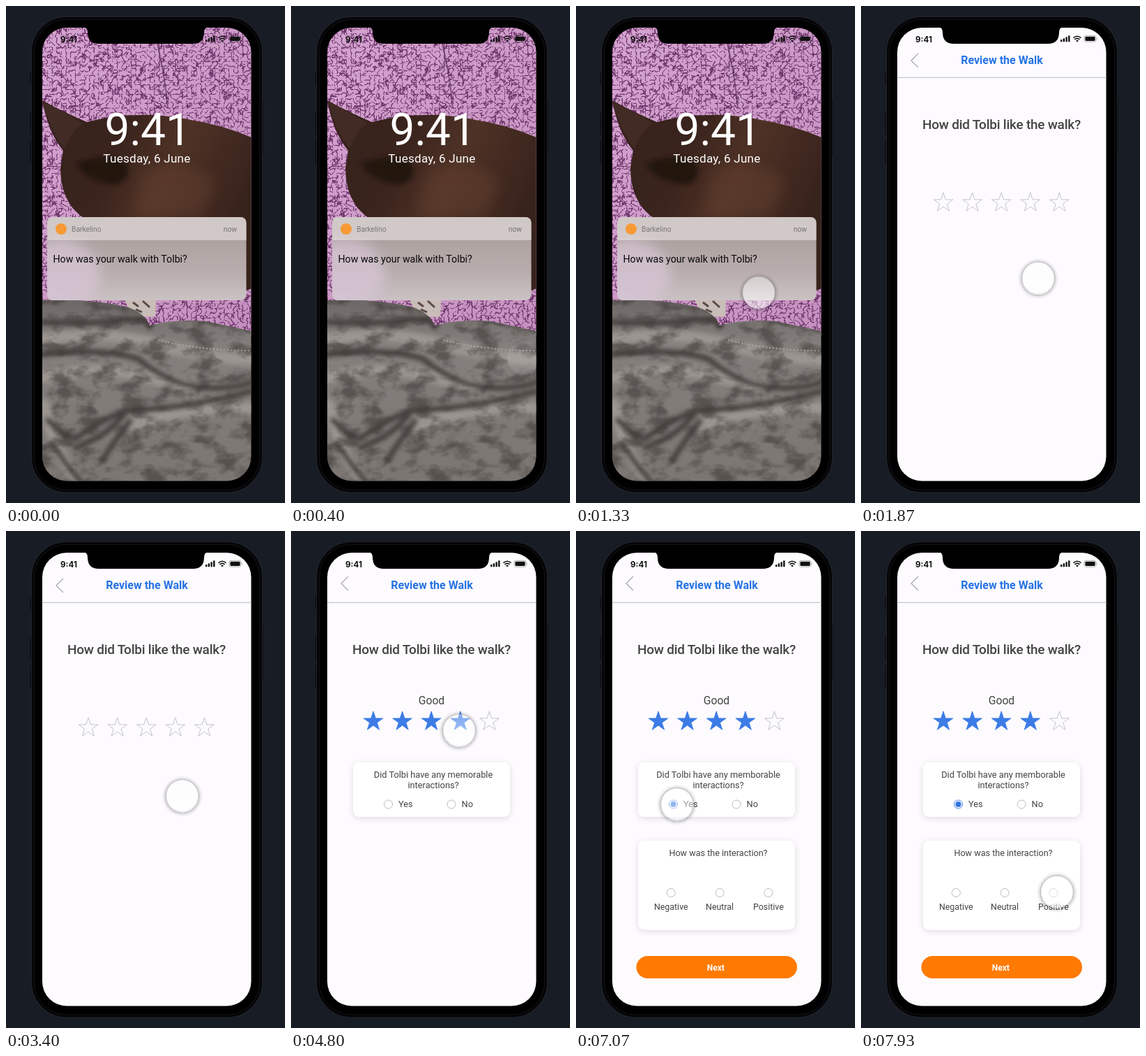
An HTML page that plays this animation: 400x711 px, repeating every 8 s.

```html
<!DOCTYPE html>
<html lang="en">
<head>
<meta charset="utf-8">
<title>Walk review</title>
<style>
  html, body { margin: 0; width: 100%; height: 100%; overflow: hidden; background: #181c24; }
  svg { display: block; width: 100%; height: 100%; }
  text { font-family: Roboto, "Open Sans", sans-serif; fill: #444; }
  .mid { text-anchor: middle; }
  .body { font-size: 12.8px; }
  .radio { fill: #fff; stroke: #b4b4b8; stroke-width: .9; }
  .card { fill: #fff; filter: url(#soft); }
</style>
</head>
<body>
<svg id="stage" viewBox="0 0 400 711" preserveAspectRatio="xMidYMid slice">
  <defs>
    <clipPath id="screen"><rect x="52" y="31" width="299.500" height="648.500" rx="35"/></clipPath>
    <clipPath id="note"><rect x="59" y="302" width="285.500" height="119" rx="8"/></clipPath>
    <clipPath id="cover"><path id="coverShape" d="M52 421Q120 418 172 430Q198 438 206 457Q240 447 286 451Q325 459 352 465V680H52Z"/></clipPath>
    <filter id="soft" x="-10%" y="-20%" width="120%" height="150%">
      <feDropShadow dx="0" dy="2" stdDeviation="4" flood-color="#000" flood-opacity=".13"/>
    </filter>
    <filter id="blur" x="-30%" y="-50%" width="160%" height="200%"><feGaussianBlur stdDeviation="9"/></filter>
    <filter id="blurSmall" x="-20%" y="-20%" width="140%" height="140%"><feGaussianBlur stdDeviation="3"/></filter>
    <filter id="fleece" x="0" y="0" width="100%" height="100%" color-interpolation-filters="sRGB">
      <feTurbulence type="turbulence" baseFrequency=".15" numOctaves="2" seed="4"/>
      <feColorMatrix values="0 0 0 0 .42  0 0 0 0 .2  0 0 0 0 .41  -7 0 0 0 1.5"/>
    </filter>
    <filter id="plush" x="0" y="0" width="100%" height="100%" color-interpolation-filters="sRGB">
      <feTurbulence type="fractalNoise" baseFrequency=".03 .05" numOctaves="4" seed="9"/>
      <feColorMatrix values="0 0 0 0 .25  0 0 0 0 .23  0 0 0 0 .22  3.500 0 0 0 -1.550"/>
    </filter>
    <linearGradient id="pink" x1="0" y1="0" x2="1" y2="1">
      <stop offset="0" stop-color="#d5a3d0"/><stop offset="1" stop-color="#c591c0"/>
    </linearGradient>
    <linearGradient id="fur" x1="0" y1="0" x2="1" y2=".4">
      <stop offset="0" stop-color="#35211c"/><stop offset=".4" stop-color="#3a241d"/>
      <stop offset=".65" stop-color="#4f3226"/><stop offset="1" stop-color="#38231c"/>
    </linearGradient>
    <linearGradient id="blanket" x1="0" y1="0" x2="0" y2="1">
      <stop offset="0" stop-color="#6d6866"/><stop offset=".25" stop-color="#85807d"/>
      <stop offset="1" stop-color="#7c7673"/>
    </linearGradient>
    <linearGradient id="glass" x1="0" y1="0" x2="0" y2="1">
      <stop offset=".25" stop-color="#aea2a1"/><stop offset=".65" stop-color="#b8adac"/>
      <stop offset="1" stop-color="#cbc2c4"/>
    </linearGradient>
    <linearGradient id="lens" x1="0" y1="0" x2="0" y2="1">
      <stop offset="0" stop-color="#fff" stop-opacity=".35"/>
      <stop offset="1" stop-color="#fff" stop-opacity=".6"/>
    </linearGradient>
    <radialGradient id="halo">
      <stop offset=".78" stop-color="#000" stop-opacity="0"/>
      <stop offset=".79" stop-color="#000" stop-opacity=".24"/>
      <stop offset=".88" stop-color="#000" stop-opacity=".08"/>
      <stop offset="1" stop-color="#000" stop-opacity="0"/>
    </radialGradient>
  </defs>

  <!-- phone -->
  <rect width="400" height="711" fill="#181c24"/>
  <g fill="#0b0c11" stroke="#22252d" stroke-width=".8">
    <rect x="34" y="94" width="4" height="19" rx="1"/>
    <rect x="34" y="151" width="4" height="34" rx="1"/>
    <rect x="34" y="191" width="4" height="34" rx="1"/>
    <rect x="365.500" y="133" width="4" height="81" rx="1"/>
    <rect x="36.500" y="15.500" width="331" height="680.500" rx="50" fill="#050507" stroke="#22242b" stroke-width="1.200"/>
    <rect x="40.500" y="19.500" width="323" height="672.500" rx="46" fill="#000" stroke="#17181d"/>
  </g>

  <g clip-path="url(#screen)">
    <g id="lock">
      <rect x="52" y="31" width="300" height="440" fill="url(#pink)"/>
      <rect x="52" y="31" width="300" height="440" filter="url(#fleece)"/>
      <path d="M217 54Q228 100 232 146" fill="none" stroke="#4d2450" stroke-opacity=".6" stroke-width="2"/>
      <path d="M52 135Q85 153 116 166Q190 147 265 163Q310 170 352 188V404Q330 416 230 412L112 304Q78 280 78 232L82 207Q60 180 52 135Z" fill="url(#fur)"/>
      <path d="M195 235Q265 215 300 250L280 300H180Z" fill="#664231" opacity=".45" filter="url(#blur)"/>
      <path d="M53 137Q82 150 110 168Q96 176 84 204Q64 180 53 137Z" fill="#422b25"/>
      <path d="M101 225Q145 208 172 224Q182 246 158 256Q112 250 101 225Z" fill="#231411" filter="url(#blurSmall)"/>
      <path d="M170 420L215 420L214 444Q192 448 176 432Z" fill="#c9bdb7"/>
      <path d="M182 424l8 6m6-8l10 9m-20 3l9 4" stroke="#594a44" stroke-width="3"/>
      <use href="#coverShape" fill="url(#blanket)"/>
      <g clip-path="url(#cover)">
        <g fill="none" filter="url(#blurSmall)" stroke-linecap="round" stroke-width="16">
          <g stroke="#9b9591">
            <path d="M52 476Q150 464 218 484T352 506"/>
            <path d="M52 532Q130 513 190 528T270 545"/>
            <path d="M180 600Q260 572 350 575"/>
            <path d="M54 570Q70 640 100 674"/>
          </g>
          <g stroke="#45403e" stroke-width="8">
            <path d="M52 452Q110 456 160 450T206 459"/>
            <path d="M48 499Q140 488 190 505Q230 540 275 545T355 537"/>
            <path d="M60 592Q80 616 100 618Q140 590 176 577Q250 580 355 550"/>
            <path d="M66 625Q85 655 108 682M100 632Q150 612 170 582M138 650Q160 615 178 595"/>
          </g>
        </g>
        <rect x="52" y="418" width="300" height="262" filter="url(#plush)" opacity=".6"/>
        <path d="M218 478Q280 493 350 493" fill="none" stroke="#b6afab" stroke-width="1.500" stroke-dasharray="2 3"/>
      </g>

      <g clip-path="url(#note)">
        <rect x="59" y="302" width="286" height="119" fill="url(#glass)"/>
        <ellipse cx="75" cy="385" rx="60" ry="50" fill="#d6c4d4" opacity=".8" filter="url(#blur)"/>
        <rect x="59" y="302" width="286" height="33" fill="#efeae9" opacity=".55"/>
      </g>
      <circle cx="79" cy="319" r="8" fill="#f79a36"/>
      <text x="94" y="323" font-size="10.300" style="fill:#7d777a">Barkelino</text>
      <text x="331" y="322.500" font-size="10.300" text-anchor="end" style="fill:#777174">now</text>
      <text x="67.500" y="366.500" font-size="14.200" style="fill:#090909">How was your walk with Tolbi?</text>
      <text class="mid" x="203.200" y="199" font-size="64" style="fill:#fff">9:41</text>
      <text class="mid" x="202" y="224" font-size="17.100" letter-spacing=".25" style="fill:#fff">Tuesday, 6 June</text>
    </g>

    <g id="review">
      <rect x="52" y="31" width="300" height="649" fill="#fdfbfe"/>
      <path id="back" d="M82 -10L72 0L82 10" fill="none" stroke="#a9a9ad" stroke-width="1.300"/>
      <text class="mid" x="202" y="83" font-size="16" font-weight="700" style="fill:#2673e4">Review the Walk</text>
      <path d="M52 102.300H352" stroke="#c5c4c7" stroke-width="1.200"/>
      <text class="mid" x="201.500" y="176.300" font-size="19" font-weight="500" letter-spacing="-.25">How did Tolbi like the walk?</text>
      <g id="stars"></g>
      <g id="rated">
        <text class="mid" x="201.500" y="247.500" font-size="15.700">Good</text>
        <rect class="card" x="89" y="331" width="225" height="78" rx="9"/>
        <text id="ask" class="mid body" x="204" y="353"></text>
        <text class="mid body" x="204" y="368">interactions?</text>
        <circle id="yes" class="radio" cx="139.500" cy="391" r="6"/>
        <circle id="dot" cx="139.500" cy="391" r="4" fill="#2f74e2"/>
        <text class="body" x="154" y="395.300">Yes</text>
        <circle class="radio" cx="230" cy="391" r="6"/>
        <text class="body" x="244.500" y="395.300">No</text>
      </g>
      <g id="detail">
        <rect class="card" x="89" y="443" width="225" height="127.500" rx="9"/>
        <text class="mid" x="204" y="465" font-size="12.600">How was the interaction?</text>
        <g id="moods"></g>
        <rect x="86.500" y="608" width="230.500" height="32" rx="16" fill="#ff7a00"/>
        <text class="mid" x="200.300" y="628.500" font-size="12" font-weight="700" style="fill:#fff">Next</text>
      </g>
    </g>

    <!-- status bar -->
    <text class="mid" x="90" y="51.500" font-size="11.600" font-weight="700" style="fill:#111;font-family:Inter,sans-serif">9:41</text>
    <g fill="#111">
      <rect x="286" y="48" width="2.400" height="3.300" rx=".6"/>
      <rect x="289.700" y="46.300" width="2.400" height="5" rx=".6"/>
      <rect x="293.400" y="44.300" width="2.400" height="7" rx=".6"/>
      <rect x="297.100" y="42.300" width="2.400" height="9" rx=".6"/>
      <path d="M308 49.500L310 51.500L312 49.500Q310 48.200 308 49.500Z"/>
      <path d="M304.500 45.600Q310 40.900 315.500 45.600M306.400 47.900Q310 44.900 313.600 47.900" fill="none" stroke="#111" stroke-width="1.600"/>
      <rect x="320" y="42.300" width="17" height="9" rx="2.500" fill="none" stroke="#111" stroke-opacity=".4" stroke-width=".8"/>
      <rect x="321.400" y="43.700" width="14.200" height="6.200" rx="1.400"/>
      <path d="M338.200 45.400q1.500 1.400 0 2.800z" fill-opacity=".5"/>
    </g>

    <g id="touch">
      <g id="idle">
        <circle cy="1" r="29.500" fill="url(#halo)"/>
        <circle r="23" fill="url(#lens)" stroke="#c2c2c6" stroke-opacity=".7" stroke-width=".8"/>
      </g>
      <circle id="pressed" r="23" fill="#e6e6e8" fill-opacity=".6" stroke="#b2b2b6" stroke-opacity=".75" stroke-width="1"/>
    </g>
  </g>
  <path d="M110 30Q117 30 117 37.500Q117 54 133 54H268Q284 54 284 37.500Q284 30 291 30Z" fill="#000"/>
</svg>

<script>
const LOOP = 8000;
const OPEN = 1800, RATED = 4400, ANSWERED = 6470;
const $ = id => document.getElementById(id);
const clamp = v => Math.max(0, Math.min(1, v));
const span = (t, a, b) => clamp((t - a) / (b - a));
const mix = (a, b, u) => a + (b - a) * u;
const ease = u => u < .5 ? 4 * u ** 3 : 1 - (2 - 2 * u) ** 3 / 2;
const show = (id, on) => $(id).setAttribute('display', on ? 'inline' : 'none');

function starPath(cx, r) {
  const points = Array.from({ length: 10 }, (_, i) => {
    const a = i * Math.PI / 5, d = i % 2 ? r * .382 : r;
    return (cx + d * Math.sin(a)).toFixed(2) + ' ' + (-d * Math.cos(a)).toFixed(2);
  });
  return 'M' + points.join('L') + 'Z';
}

$('stars').innerHTML = [0, 1, 2, 3, 4]
  .map(i => `<path d="${starPath(118 + 41.6 * i, 14.6)}" stroke-width=".9"/>`).join('');
const stars = [...$('stars').children];

$('moods').innerHTML = ['Negative', 'Neutral', 'Positive'].map((name, i) => {
  const x = 136.3 + 69.8 * i;
  return `<circle class="radio" cx="${x}" cy="517.5" r="6"/>` +
    `<text class="mid" x="${x}" y="542.3" font-size="12.4">${name}</text>`;
}).join('');

// start, end, then the place to reach
const moves = [
  [3070, 4200, 241, 285],
  [4930, 5750, 141, 387],
  [6900, 7800, 281, 516]
];

function touchPlace(t) {
  const left = 1 - span(t, 100, 1800);
  let x = 254 + 119 * left ** 2.1;
  let y = 389 + 155 * left ** 1.56;
  for (const [a, b, toX, toY] of moves) {
    const u = ease(span(t, a, b));
    x = mix(x, toX, u);
    y = mix(y, toY, u);
  }
  return [x, y];
}

const press = (t, a, b) => span(t, a, a + 130) * (1 - span(t, b - 130, b));

function draw(t) {
  const rated = t >= RATED, answered = t >= ANSWERED;
  show('lock', t < OPEN);
  show('review', t >= OPEN);
  show('rated', rated);
  show('detail', answered);
  show('dot', answered);
  $('yes').style.stroke = answered ? '#2f74e2' : '';
  $('ask').textContent = 'Did Tolbi have any ' + (answered ? 'memborable' : 'memorable');
  $('back').setAttribute('transform', `translate(0 ${rated ? 75 : 78})`);
  $('stars').setAttribute('transform', `translate(0 ${rated ? 272.5 : 281.5})`);
  stars.forEach((star, i) => {
    const on = rated && i < 4;
    star.setAttribute('fill', on ? '#3d7ce6' : 'none');
    star.setAttribute('stroke', on ? '#3d7ce6' : '#bdbdc1');
  });

  const [x, y] = touchPlace(t);
  const down = Math.max(1 - span(t, 870, 1250), press(t, 1560, 1850), press(t, 4210, 4600), press(t, 5980, 6600));
  $('touch').setAttribute('transform', `translate(${x.toFixed(2)} ${y.toFixed(2)})`);
  $('touch').setAttribute('opacity', .5 * span(t, 100, 800) + .5 * span(t, 800, 1250));
  $('idle').setAttribute('opacity', 1 - down);
  $('pressed').setAttribute('opacity', down);
}

const begin = performance.now();
function tick() {
  draw((performance.now() - begin) % LOOP);
  requestAnimationFrame(tick);
}
draw(0);
requestAnimationFrame(tick);
</script>
</body>
</html>
```
